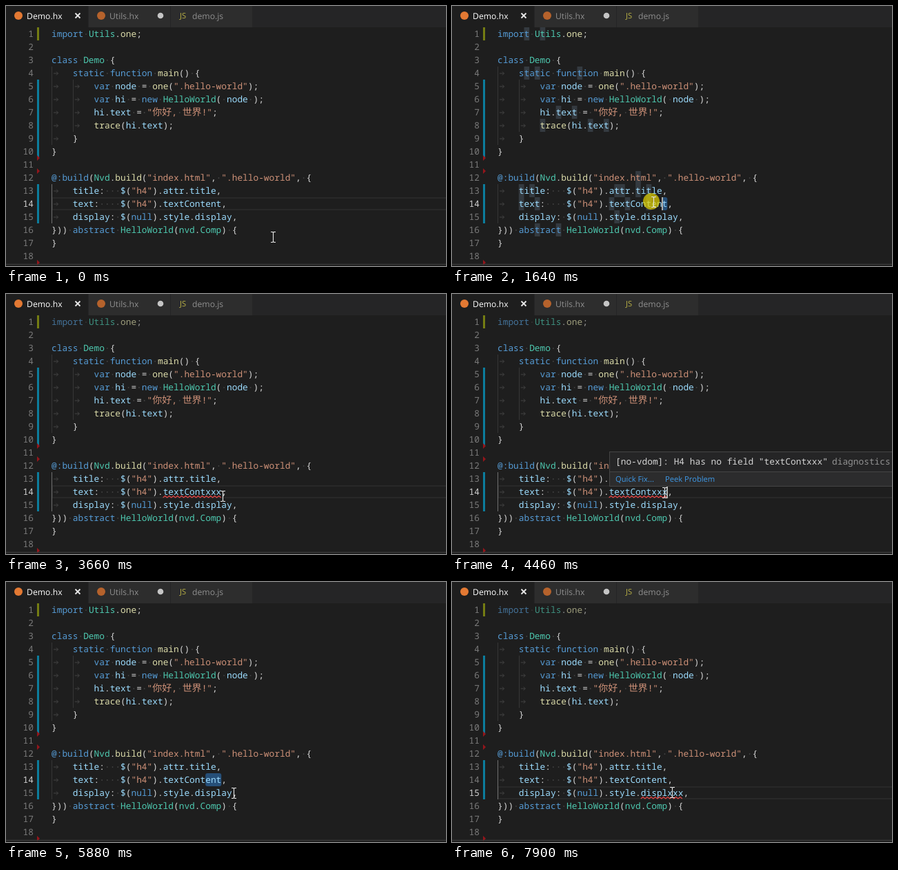
Write an HTML page that moves like this. It is 638 px wide and 378 px high and loops after 8000 ms.

```html
<!DOCTYPE html>
<html lang="en">
<head>
<meta charset="utf-8">
<title>Editor diagnostics</title>
<style>
  html, body { margin: 0; width: 100%; height: 100%; overflow: hidden; background: #1e1e1e; }
  svg { display: block; width: 638px; height: 378px; }
  text { text-rendering: geometricPrecision; }
  .code { font: 12.83px "Noto Sans Mono", "DejaVu Sans Mono", monospace; }
  .cjk { font: 14px "Noto Sans CJK SC", "Noto Sans CJK", sans-serif; }
  .ui { font: 12.2px "Open Sans", "Noto Sans", sans-serif; }
  .small { font-size: 11.2px; }
</style>
</head>
<body>
<svg id="stage" viewBox="0 0 638 378"></svg>
<script>
const LOOP = 8000, LEFT = 66, TOP = 31, ROW = 19, CHAR = 7.697, WIDE = 14;
const BLUE = '#569cd6', TEAL = '#4ec9b0', YELLOW = '#dcdcaa', PALE = '#9cdcfe',
      STRING = '#ce9178', PLAIN = '#d4d4d4', FAINT = '#434343';

const wordColors = {};
const colorWords = (color, words) => words.split(' ').forEach(w => wordColors[w] = color);
colorWords(BLUE, 'import class static function var new abstract null');
colorWords(TEAL, 'Utils Demo HelloWorld Nvd nvd Comp');
colorWords(YELLOW, 'main one trace build');

const codeLines = (field, style) => [
  'import Utils.one;',
  '',
  'class Demo {',
  '\tstatic function main() {',
  '\t\tvar node = one(".hello-world");',
  '\t\tvar hi = new HelloWorld( node );',
  '\t\thi.text = "你好, 世界!";',
  '\t\ttrace(hi.text);',
  '\t}',
  '}',
  '',
  '@:build(Nvd.build("index.html", ".hello-world", {',
  '\ttitle:   $("h4").attr.title,',
  `\ttext:    $("h4").${field},`,
  `\tdisplay: $(null).style.${style},`,
  '})) abstract HelloWorld(nvd.Comp) {',
  '}',
  ''
];

// Each step overrides part of the state before it.
const steps = [
  [0, { mouse: [387, 336], press: false, line: 14, field: 'textContent', style: 'display',
        sel: null, caret: null, dirty: false, wave: null, dim: false, popup: false }],
  [200, { mouse: [373, 325] }],
  [400, { mouse: [341, 307] }],
  [600, { mouse: [312, 293] }],
  [800, { mouse: [303, 290] }],
  [1220, { mouse: [313, 289] }],
  [1420, { mouse: [313, 288], press: true, caret: 32 }],
  [1640, { mouse: [292, 285], sel: [31, 32], caret: 31 }],
  [1840, { mouse: [289, 286], sel: [29, 32], caret: 29, press: false }],
  [2040, { mouse: [325, 294], caret: null }],
  [2220, { mouse: [347, 299], sel: null, field: 'textContx', caret: 30, dirty: true }],
  [2420, { field: 'textContxx', caret: 31 }],
  [2640, { field: 'textContxxx', caret: 32 }],
  [3040, { mouse: [345, 305], dirty: false }],
  [3240, { mouse: [338, 314], wave: [21, 32], dim: true }],
  [3440, { mouse: [326, 306], caret: null }],
  [3640, { mouse: [314, 294] }],
  [3860, { mouse: [308, 289], caret: 32 }],
  [4060, { popup: true, caret: null }],
  [4460, { caret: 32 }],
  [5080, { popup: false, field: 'textContent', sel: [29, 32], caret: null, dirty: true, wave: null }],
  [5480, { mouse: [310, 291], dirty: false, dim: false }],
  [5680, { mouse: [321, 299] }],
  [5880, { mouse: [330, 307] }],
  [6080, { press: true, line: 15, sel: null, caret: 34 }],
  [6280, { mouse: [314, 306], sel: [32, 34], caret: 32 }],
  [6480, { mouse: [316, 307], press: false }],
  [6680, { mouse: [330, 310], sel: null, style: 'displx', caret: 33, dirty: true }],
  [6900, { mouse: [336, 315], style: 'displxx', caret: 34 }],
  [7100, { mouse: [346, 328], style: 'displxxx', caret: 35 }],
  [7300, { mouse: [351, 335], dirty: false }],
  [7500, { mouse: [335, 321], wave: [27, 35], dim: true }],
  [7700, { mouse: [320, 309], caret: null }],
  [7900, { mouse: [319, 306] }]
];

const colX = col => LEFT + col * CHAR;
const rowY = line => TOP + (line - 1) * ROW;
const isWide = ch => ch > '\u2e80';
const advance = ch => ch === '\t' ? 4 * CHAR : isWide(ch) ? WIDE : CHAR;
const textX = (text, i) => [...text.slice(0, i)].reduce((x, ch) => x + advance(ch), LEFT);

const rect = (x, y, w, h, fill, more = '') =>
  `<rect x="${x}" y="${y}" width="${w}" height="${h}" fill="${fill}" ${more}/>`;
const label = (x, y, str, fill, cls = 'code', more = '') =>
  `<text x="${x}" y="${y}" fill="${fill}" class="${cls}" ${more}>${str}</text>`;
const stroke = (d, color, width = 1, more = '') =>
  `<path d="${d}" fill="none" stroke="${color}" stroke-width="${width}" ${more}/>`;
const dot = (x, y, r, fill, more = '') => `<circle cx="${x}" cy="${y}" r="${r}" fill="${fill}" ${more}/>`;

function tokenColor(token) {
  if (token[0] === '"') return STRING;
  if (token.startsWith('@:')) return BLUE;
  if (/^[\w$]/.test(token)) return wordColors[token] || PALE;
  return PLAIN;
}

function drawLine(text, line) {
  const y = rowY(line);
  let out = '';
  for (const m of text.matchAll(/"[^"]*"|@:\w+|[\w$]+|[^\s\w$"]+/g)) {
    const color = tokenColor(m[0]);
    for (const run of m[0].matchAll(/[\u2e80-\uffff]+|[^\s\u2e80-\uffff]+/g))
      out += label(textX(text, m.index + run.index), y + 14, run[0], color,
        isWide(run[0][0]) ? 'cjk' : 'code');
  }
  [...text].forEach((ch, i) => {
    const x = textX(text, i);
    if (ch === ' ') out += dot(x + CHAR / 2, y + 10, 0.9, FAINT);
    if (ch === '\t') out += stroke(`M${x + 3} ${y + 10}h6.5m-2.5-2.5l2.5 2.5l-2.5 2.5`, FAINT);
  });
  return out;
}

function drawTabs(dirty) {
  const marker = (x, open) => open
    ? dot(x, 14, 4.3, '#c5c5c5')
    : stroke(`M${x - 3.5} 10.5l7 7m0-7l-7 7`, '#e8e8e8', 1.8);
  return rect(0, 0, 638, TOP, '#252526') + rect(0, 0, 119, TOP, '#1e1e1e') +
    rect(120, 0, 118, TOP, '#2d2d2d') + rect(239, 0, 118, TOP, '#2d2d2d') +
    dot(18, 14, 6, '#e37933') + dot(138, 14, 6, '#b5622c') +
    label(30, 18.5, 'Demo.hx', '#ffffff', 'ui') +
    label(150, 18.5, 'Utils.hx', '#8f8f8f', 'ui') +
    label(252, 18, 'JS', '#b9b146', 'ui small', 'font-weight="700"') +
    label(270, 18.5, 'demo.js', '#8f8f8f', 'ui') +
    marker(104, dirty) + marker(224, true);
}

function drawGutter(active) {
  const bar = (from, to, color) => rect(45, rowY(from), 3, (to - from + 1) * ROW, color);
  let out = bar(1, 1, '#747d12') + bar(5, 10, '#0c7d9d') + bar(13, 15, '#0c7d9d');
  for (const line of [10, 11, 18])
    out += `<path d="M45 ${rowY(line + 1) - 4}l4 4l-4 4z" fill="#94151b"/>`;
  for (let n = 1; n <= 18; n++)
    out += label(40, rowY(n) + 14, n, n === active ? '#d0d0d0' : '#7a7a7a', 'code', 'text-anchor="end"');
  return out;
}

function drawGuides(active) {
  const guide = (col, from, to, color) =>
    rect(Math.round(colX(col)), rowY(from), 1, (to - from + 1) * ROW, color);
  return guide(0, 4, 9, '#363636') + guide(4, 5, 8, '#363636') +
    guide(0, 13, 15, active ? '#707070' : '#363636');
}

function drawSelection(lines, s) {
  if (!s.sel) return rect(LEFT + 1, rowY(s.line) + 1, 590, ROW - 2, 'none', 'stroke="#282828" stroke-width="2"');
  const [from, to] = s.sel;
  // A leading tab fills four columns but is a single character.
  const chosen = lines[s.line - 1].slice(from - 3, to - 3);
  let out = '';
  lines.forEach((text, i) => {
    for (const m of text.matchAll(new RegExp(chosen, 'g'))) {
      const own = i + 1 === s.line && m.index === from - 3;
      out += rect(textX(text, m.index), rowY(i + 1), chosen.length * CHAR, ROW,
        own ? '#264f78' : '#343a40', own ? 'rx="3"' : '');
    }
  });
  return out;
}

function drawWave(line, [from, to]) {
  const end = colX(to);
  let x = colX(from), up = false, d = `M${x} ${rowY(line) + 18}`;
  while (x + 3 <= end) {
    x += 3;
    up = !up;
    d += `l3 ${up ? -2.5 : 2.5}`;
  }
  return stroke(d, '#ea4646', 1.1);
}

function drawPopup() {
  return rect(228.5, 229.5, 430, 50, '#252526', 'stroke="#454545"') +
    rect(229, 259, 430, 20, '#2c2c2d') + rect(229, 258, 430, 1, '#454545') +
    label(237, 248, '[no-vdom]: H4 has no field "textContxxx"', PLAIN) +
    label(551, 248, 'diagnostics(', '#929292') +
    label(237, 273, 'Quick Fix...', '#3f9ae8', 'ui small') +
    label(309, 273, 'Peek Problem', '#3f9ae8', 'ui small');
}

function drawMouse([x, y], press) {
  return (press ? dot(x - 3, y - 1, 12, '#e0d000', 'opacity="0.72"') : '') +
    stroke(`M${x - 3} ${y - 7.5}h2.5l1 1l1-1h2.5M${x + 0.5} ${y - 6.5}v13` +
      `M${x - 3} ${y + 7.5}h2.5l1-1l1 1h2.5`, '#e6e6e6', 1.1);
}

function draw(s) {
  const lines = codeLines(s.field, s.style);
  const code = lines.map((text, i) => {
    const line = drawLine(text, i + 1);
    return i === 0 && s.dim ? `<g opacity="0.667">${line}</g>` : line;
  }).join('');
  return rect(0, 0, 638, 378, '#1e1e1e') + drawTabs(s.dirty) +
    drawSelection(lines, s) + drawGuides(!s.sel) + drawGutter(s.line) + code +
    (s.wave ? drawWave(s.line, s.wave) : '') +
    (s.caret === null ? '' : rect(Math.round(colX(s.caret)) - 1, rowY(s.line), 2, ROW, '#aeafad')) +
    rect(0, 375, 638, 1, '#414141') +
    (s.popup ? drawPopup() : '') + drawMouse(s.mouse, s.press);
}

const stage = document.getElementById('stage');
let shown = -1;

function render(time) {
  const t = time % LOOP;
  const count = steps.filter(([at]) => at <= t).length;
  if (count !== shown) {
    shown = count;
    stage.innerHTML = draw(Object.assign({}, ...steps.slice(0, count).map(step => step[1])));
  }
}

const start = performance.now();
function tick() {
  render(performance.now() - start);
  requestAnimationFrame(tick);
}
tick();
</script>
</body>
</html>
```
